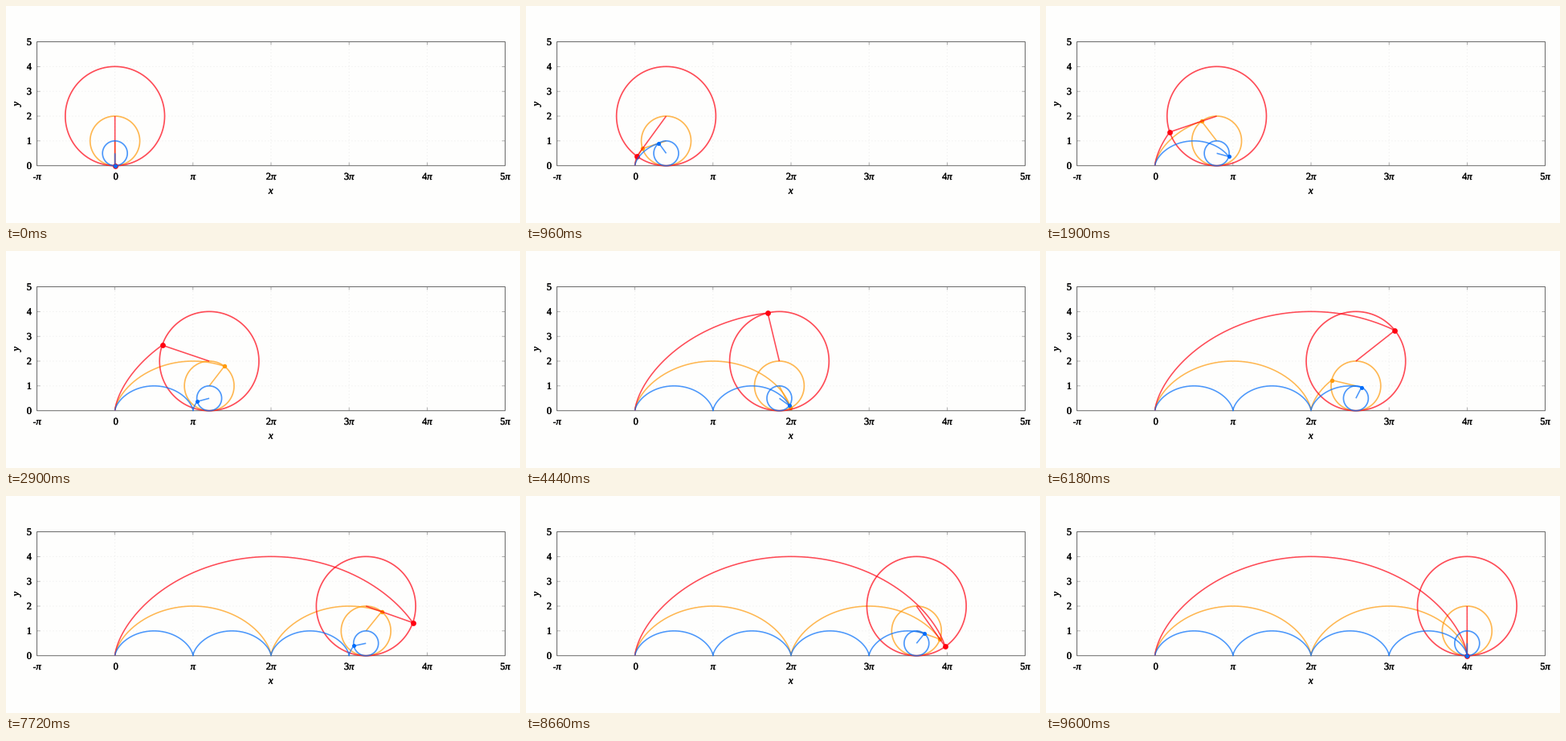
Write a matplotlib script that moves like this. It is 640 by 270 pixels and loops after 9620 ms.

```python
import numpy as np
import matplotlib.pyplot as plt
from matplotlib.animation import FuncAnimation
from matplotlib.patheffects import withStroke

W, H, DPI = 640, 270, 100
STEPS, INTERVAL = 480, 20
LEFT, RIGHT, TOP, BOTTOM = 38.5, 621.5, 44.5, 198.7
UNIT_X = (RIGHT - LEFT) / (6 * np.pi)
UNIT_Y = (BOTTOM - TOP) / 5
PT = 72 / DPI
FONT = 12.5

# radius, colour, dot diameter in px; listed from back to front
WHEELS = [
    (1.0, "#ff9a0a", 5.4),
    (2.0, "#ff0010", 6.8),
    (0.5, "#006cfa", 5.0),
]

fig = plt.figure(figsize=(W / DPI, H / DPI), dpi=DPI, facecolor="#fefefd")
ax = fig.add_axes([0, 0, 1, 1])
ax.set_xlim(0, W)
ax.set_ylim(H, 0)
ax.axis("off")


def px(x):
    return LEFT + (x + np.pi) * UNIT_X


def py(y):
    return BOTTOM - y * UNIT_Y


def stroke(xs, ys, color, width, **kw):
    return ax.plot(xs, ys, color=color, lw=width * PT, snap=False,
                   solid_capstyle="butt", **kw)[0]


def label(x, y, s, **kw):
    heavier = [withStroke(linewidth=0.25, foreground="black")]
    ax.text(x, y, s, family="Liberation Serif", fontsize=FONT * PT,
            color="black", va="baseline", path_effects=heavier, **kw)


def pi_label(x, prefix):
    """Upright prefix followed by an italic pi, centred on x."""
    pre_w = {"": 0, "-": 0.333}.get(prefix, 0.5) * FONT
    start = x - (pre_w + 0.5 * FONT) / 2
    label(start, 216, prefix)
    label(start + pre_w, 216, "π", style="italic")


def draw_frame():
    grid = dict(linestyle=(0, (1, 4)), zorder=1)
    xs = [px(k * np.pi) for k in range(-1, 6)]
    ys = [py(k) for k in range(6)]
    for x in xs[1:-1]:
        stroke([x, x], [BOTTOM, TOP], "#e2e2e2", 0.8, **grid)
    for y in ys[1:-1]:
        stroke([LEFT, RIGHT], [y, y], "#e2e2e2", 0.8, **grid)

    tick_x, tick_y = [], []
    for x in xs[1:-1]:
        tick_x += [x, x, np.nan, x, x, np.nan]
        tick_y += [BOTTOM, BOTTOM - 4, np.nan, TOP, TOP + 4, np.nan]
    for y in ys[1:-1]:
        tick_x += [LEFT, LEFT + 4, np.nan, RIGHT, RIGHT - 4, np.nan]
        tick_y += [y, y, np.nan, y, y, np.nan]
    stroke(tick_x, tick_y, "#8c8c8c", 0.7, zorder=2)
    stroke([LEFT, RIGHT, RIGHT, LEFT, LEFT],
           [BOTTOM, BOTTOM, TOP, TOP, BOTTOM], "#6a6a6a", 1, zorder=2)

    for k, y in enumerate(ys):
        label(32, y + 4, str(k), ha="right")
    for x, prefix in zip(xs, ["-", None, "", "2", "3", "4", "5"]):
        if prefix is None:
            label(x + 1, 216, "0", ha="center")
        else:
            pi_label(x, prefix)
    label(329.7, 233.5, "x", style="italic", ha="center")
    label(16, 121.8, "y", style="italic", ha="center", rotation=90,
          rotation_mode="anchor")


class Wheel:
    ring = np.linspace(0, 2 * np.pi, 121)

    def __init__(self, r, color, dot, z):
        self.r = r
        kw = dict(alpha=0.7, zorder=z)
        self.trail = stroke([], [], color, 1.6, **kw)
        self.circle = stroke([], [], color, 1.7, **kw)
        self.spoke = stroke([], [], color, 1.6, **kw)
        self.dot = ax.plot([], [], "o", color=color, ms=dot * PT, mew=0,
                           snap=False, zorder=z + 0.5)[0]
        self.parts = [self.trail, self.circle, self.spoke, self.dot]

    def roll(self, path):
        r = self.r
        x = px(path - r * np.sin(path / r))
        y = py(r - r * np.cos(path / r))
        cx, cy = px(path[-1]), py(r)
        self.trail.set_data(x, y)
        self.circle.set_data(cx + r * UNIT_X * np.cos(self.ring),
                             cy + r * UNIT_Y * np.sin(self.ring))
        self.spoke.set_data([cx, x[-1]], [cy, y[-1]])
        self.dot.set_data([x[-1]], [y[-1]])


draw_frame()
wheels = [Wheel(*spec, z=3 + k) for k, spec in enumerate(WHEELS)]
travel = np.linspace(0, 4 * np.pi, STEPS + 1)


def update(i):
    for wheel in wheels:
        wheel.roll(travel[:i + 1])
    return [part for wheel in wheels for part in wheel.parts]


anim = FuncAnimation(fig, update, frames=STEPS + 1, interval=INTERVAL,
                     init_func=lambda: update(0), repeat=True,
                     repeat_delay=0, blit=True)
plt.show()
```
